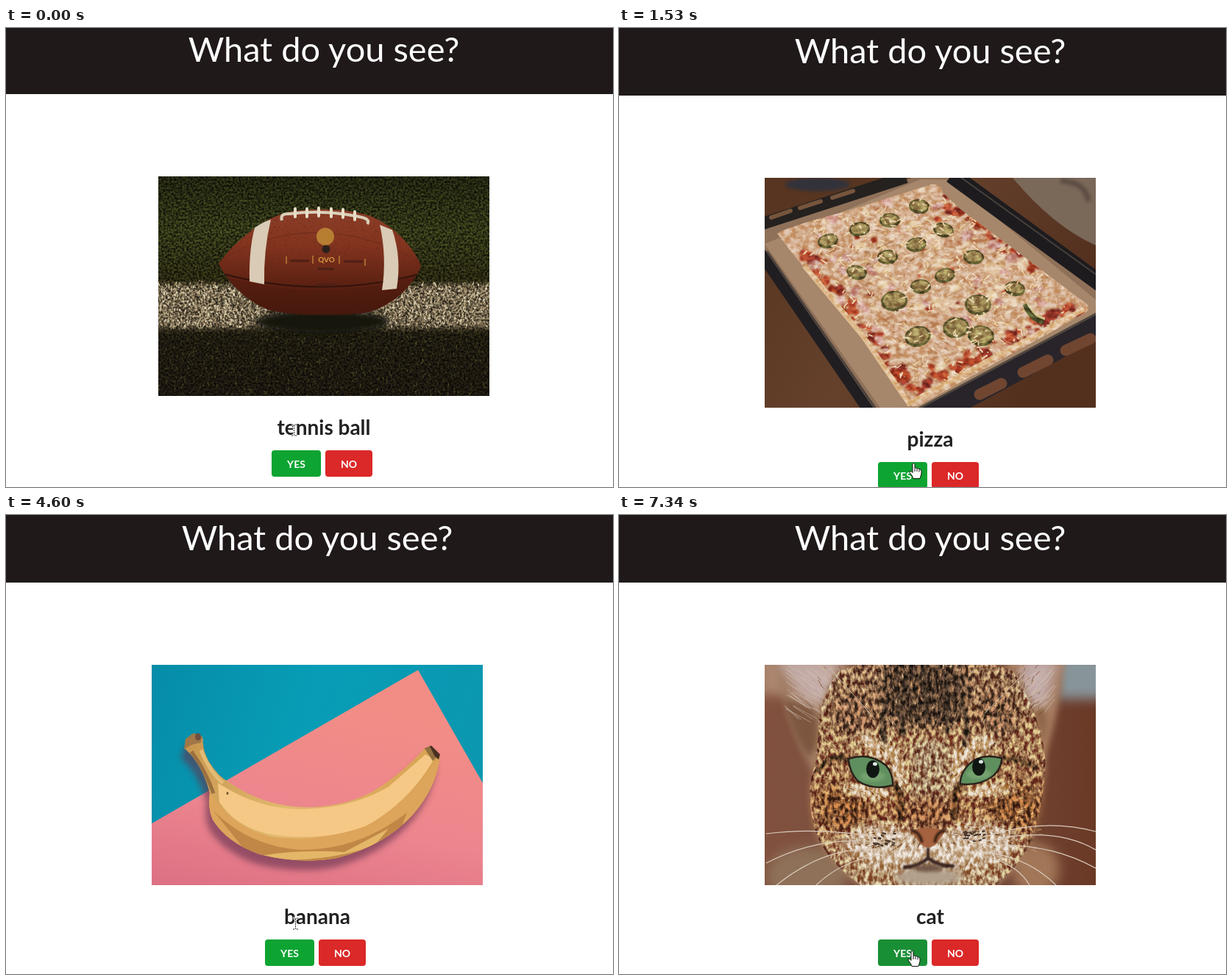
These frames come from a looping animation (825 by 625 pixels, 7460 ms). An HTML page:

```html
<!DOCTYPE html>
<html lang="en">
<head>
<meta charset="utf-8">
<title>What do you see?</title>
<style>
html, body { margin: 0; width: 100%; height: 100%; overflow: hidden; background: #fff; }
svg { display: block; font-family: Lato, sans-serif; }
.grain { mix-blend-mode: overlay; }
</style>
</head>
<body>
<svg id="stage" width="825" height="625" viewBox="0 0 825 625"></svg>
<script>
const LOOP = 7460;
let seed = 7;
const rnd = () => (seed = seed * 16807 % 2147483647) / 2147483647;
const spread = a => (rnd() * 2 - 1) * a;
const within = (x, y, w, h) => () => [x + rnd() * w, y + rnd() * h];

// Drawing helpers, all in stage coordinates
const rect = (x, y, w, h, f, a = '') => `<rect x="${x}" y="${y}" width="${w}" height="${h}" fill="${f}" ${a}/>`;
const shape = (d, f, a = '') => `<path d="${d}" fill="${f}" ${a}/>`;
const line = (d, c, w, a = '') => `<path d="${d}" fill="none" stroke="${c}" stroke-width="${w}" ${a}/>`;
const oval = (x, y, rx, ry, f, rot = 0, a = '') =>
  `<ellipse cx="${x}" cy="${y}" rx="${rx}" ry="${ry}" fill="${f}" transform="rotate(${rot} ${x} ${y})" ${a}/>`;
const blur = n => `filter="url(#blur${n})"`;
const soft = (n, body) => `<g ${blur(n)}>${body}</g>`;
const clip = (id, body) => `<g clip-path="url(#${id})">${body}</g>`;
const grain = (id, d, opacity) => shape(d, '#888', `class="grain" filter="url(#${id})" opacity="${opacity}"`);
const clipDef = (id, d) => `<clipPath id="${id}"><path d="${d}"/></clipPath>`;
const grad = (id, stops, x2 = 0, y2 = 1) => `<linearGradient id="${id}" x1="0" y1="0" x2="${x2}" y2="${y2}">` +
  stops.map((c, i) => `<stop offset="${i / (stops.length - 1)}" stop-color="${c}"/>`).join('') + '</linearGradient>';

// Procedural texture: noise mapped on a row of colours
function texture(id, freq, gain, colors = ['#000000', '#ffffff']) {
  const row = `${gain} 0 0 0 ${.5 - gain / 2} `;
  const channel = (name, i) => `<feFunc${name} type="table" tableValues="` +
    colors.map(c => (parseInt(c.substr(1 + 2 * i, 2), 16) / 255).toFixed(3)).join(' ') + '"/>';
  return `<filter id="${id}" x="0" y="0" width="100%" height="100%" color-interpolation-filters="sRGB">` +
    `<feTurbulence type="fractalNoise" baseFrequency="${freq}" numOctaves="4" seed="5"/>` +
    `<feColorMatrix values="${row.repeat(3)}0 0 0 0 1"/>` +
    `<feComponentTransfer>${['R', 'G', 'B'].map(channel).join('')}</feComponentTransfer>` +
    '<feComposite in2="SourceGraphic" operator="in"/></filter>';
}

// Many short strokes joined in one path
function blades(n, color, width, pos, step) {
  let d = '';
  for (let i = 0; i < n; i++) {
    const [x, y] = pos(), [dx, dy] = step(x, y);
    d += `M${x.toFixed(1)} ${y.toFixed(1)}l${dx.toFixed(1)} ${dy.toFixed(1)}`;
  }
  return line(d, color, width);
}
function blobs(n, colors, pos, min, max) {
  let s = '';
  for (let i = 0; i < n; i++) {
    const [x, y] = pos().map(Math.round), r = min + rnd() * (max - min);
    s += oval(x, y, r.toFixed(1), (r * (.4 + rnd() * .4)).toFixed(1), colors[i % colors.length], Math.round(spread(60)));
  }
  return s;
}

const shapes = {
  ball: 'M289 321C306 297 342 262 382 251C417 244 462 246 492 255C527 267 557 302 564 325C552 352 527 377 492 387C457 393 387 392 357 384C327 372 302 347 289 321Z',
  pizza: 'M198 250Q260 215 330 205H505Q590 225 648 275V452Q560 488 450 496Q300 500 198 440Z',
  dough: 'M215 280Q225 272 300 252L425 213Q438 211 440 224L462 245L636 376Q642 384 630 390L415 510Q400 520 390 510L330 420L250 325Z',
  banana: 'M243 318Q246 302 252 299Q264 296 268 305Q266 318 276 336Q288 356 302 363Q350 398 412 398Q470 397 512 368Q545 345 569 318Q578 311 590 327Q586 370 553 408Q515 450 450 467Q400 476 345 462Q300 446 281 415Q274 400 277 378Q268 345 250 325Z',
  head: 'M300 212Q420 170 535 212Q578 280 580 345Q575 400 562 440Q540 485 505 510H338Q275 470 264 420Q252 370 270 330Q265 255 300 212Z'
};

function drawBall() {
  const grass = () => [spread(4), -3 - rnd() * 4], bar = within(207, 350, 450, 60);
  return rect(207, 202, 450, 299, 'url(#turf)') +
    blades(400, '#39401988', 1, within(207, 206, 450, 140), grass) +
    blades(500, '#39381a', 1, within(207, 412, 450, 92), grass) +
    rect(200, 350, 464, 58, '#72664f', blur(4)) +
    blades(700, '#443b2b', 1.6, bar, grass) + blades(700, '#9a8a6d', 1.3, bar, grass) +
    blades(600, '#c8b998', 1.1, bar, grass) +
    grain('fine', 'M207 202h450v299h-450Z', .6) +
    oval(430, 400, 92, 17, '#15120d', 0, blur(4)) +
    shape(shapes.ball, 'url(#hide)') +
    clip('cBall', blades(900, '#642617', 1, within(285, 245, 285, 148), () => [1.2, .6]) +
      shape('M285 334Q425 380 566 334V400H285Z', '#511b10', 'opacity=".6"') +
      line('M285 332Q425 372 566 334', '#32130c', 2) + line('M292 316Q420 240 562 318', '#6c2c1d', 1)) +
    shape('M338 272Q349 264 360 261Q350 302 351 349L331 345Q330 302 338 272Z', '#d9cbb5') +
    shape('M508 268L525 275Q538 312 531 355L511 357Q518 312 508 268Z', '#d9cbb5') +
    line('M375 262Q372 252 386 253Q432 247 480 257Q496 260 491 267', '#d9cfb8', 4) +
    line('M393 246v11M409 246v11M425 245v11M442 246v11M458 247v11M474 250v11', '#e8dec7', 4, 'stroke-linecap="round"') +
    `<circle cx="434" cy="284" r="12" fill="#b77e32"/><circle cx="435" cy="301" r="5.5" fill="#2b211c"/>` +
    line('M381 311v10M417 310v11M453 310v11M488 314v10', '#c08a3b', 1.3) +
    line('M386 317h26M459 318h26M424 328h22M421 350h29', '#4d2015', 3) +
    `<text x="435.5" y="319" font-size="10" font-weight="700" fill="#d39a42" text-anchor="middle">QVO</text>`;
}

function drawPizza() {
  const all = within(198, 225, 450, 235);
  const meat = (x, y, rx, ry, r) => oval(x, y + 4, rx, ry, '#42200f', r) + oval(x, y, rx - 1, ry - 1, '#80401d', r) +
    oval(x - 3, y - 2, rx * .65, ry * .45, '#a86434', r);
  return rect(198, 204, 450, 300, '#7a6d66') + rect(198, 210, 90, 45, '#5f4b48', blur(8)) +
    rect(198, 440, 450, 64, '#40302f') + line('M198 478Q240 490 300 504M560 498L648 478', '#6a4a3c', 5) +
    shape(shapes.pizza, '#c77a36', 'filter="url(#cheese)"') +
    clip('cPizza', soft(1,
      blobs(70, ['#a4451b', '#c4662a', '#8c3a17'], all, 4, 14) +
      blobs(85, ['#eee0bd', '#e9cf9a', '#dfdcc6'], all, 4, 17) +
      blobs(200, ['#e0a052', '#7b3214', '#f2e6cb', '#bd6325'], all, 1, 5) +
      blobs(22, ['#66652f', '#85793a', '#4f3420'], all, 3, 9)) +
      line('M402 204L421 320L434 455M216 360L421 320L640 418', '#93411b', 4, 'opacity=".6" ' + blur(1))) +
    soft(1, line('M192 252Q250 218 335 208M505 212Q590 232 654 284', '#dcc6a4', 9) +
      line('M192 412Q290 466 400 474Q540 474 654 426', '#8a2b2a', 13, 'opacity=".8" stroke-dasharray="70 9 34 14"') +
      line('M190 437Q270 488 410 488Q555 482 656 443', '#cf9f63', 19) +
      line('M190 431Q275 480 410 482Q550 476 656 438', '#efdab2', 9, 'stroke-dasharray="58 7 31 5"')) +
    soft(1, meat(275, 288, 37, 12, -4) + meat(515, 270, 31, 12, 8) + meat(608, 340, 40, 13, -16) +
      meat(327, 404, 42, 21, -16) + meat(350, 313, 20, 10, 15) + meat(466, 386, 13, 20, -20) +
      meat(466, 234, 27, 8, 10) + meat(310, 244, 17, 11, -25)) +
    line('M586 323l20 -3M526 358q36 10 70 8', '#c5251a', 6) +
    line('M536 390Q538 360 558 356Q575 358 574 382', '#e9c680', 5) +
    oval(432, 494, 19, 9, '#2c2628', 0, blur(1)) + oval(548, 479, 20, 9, '#302426', 0, blur(1)) +
    oval(218, 418, 18, 7, '#4f4a2a', 15, blur(1)) + grain('crumb', shapes.pizza, .45);
}

function drawTray() {
  const edge = (x1, y1, x2, y2) => () => {
    const k = rnd();
    return [x1 + (x2 - x1) * k + spread(10), y1 + (y2 - y1) * k + spread(8)];
  };
  const pickles = [[284, 290], [327, 274], [368, 262], [408, 243], [441, 275], [404, 295], [365, 312], [482, 312],
    [323, 333], [443, 337], [374, 372], [488, 377], [538, 355], [406, 420], [458, 408], [410, 352], [492, 419]];
  const reds = ['#a73d20', '#8e3027', '#bd5130'];
  const shred = () => [spread(9), spread(7)], middle = within(255, 235, 355, 245);
  return rect(198, 204, 450, 313, 'url(#wood)') +
    shape('M535 204H648V296Q590 270 535 204Z', '#7a6859') + line('M600 208q35 2 38 28', '#5c4b43', 7, blur(2)) +
    shape('M198 204H380L198 258Z', '#573521') + oval(270, 213, 44, 9, '#30303b', 0, blur(2)) +
    shape('M198 270L398 204H462L648 352V398L420 517H340L198 318Z', '#8f7159') +
    shape('M198 294L410 206L450 207L648 370V396L400 530L355 517Z', '#a6876b') +
    line('M190 268L390 203', '#24211f', 17) + line('M207 258l26 -9M246 245l28 -9M290 231l28 -9', '#76553c', 6, 'stroke-linecap="round"') +
    line('M192 306L340 522', '#211e21', 15) + line('M201 304L350 520', '#4c423d', 3) +
    line('M452 200L660 352', '#1d1b1e', 23) + line('M464 203L660 344', '#47403b', 2) +
    line('M400 540L660 400', '#28242a', 33) + line('M400 522L660 383', '#51473f', 3) +
    line('M490 499l30 -15M549 469l34 -17M607 439l34 -16', '#704631', 15, 'stroke-linecap="round"') +
    shape(shapes.dough, '#d2aa88') +
    clip('cDough', soft(1, blobs(100, ['#d9b69a', '#c99a77', '#e1c4a3'], within(220, 215, 410, 290), 7, 17) +
      blobs(50, reds, edge(252, 305, 390, 485), 3, 10) + blobs(50, reds, edge(400, 490, 620, 380), 3, 10) +
      blobs(32, reds, edge(435, 225, 615, 365), 3, 8) + blobs(36, reds, within(270, 250, 300, 200), 2, 6) +
      blobs(80, ['#d9aba0', '#c9968a', '#e7d1ae'], middle, 4, 10)) +
      blades(260, '#b9906a', 1.5, middle, shred) +
      pickles.map(([x, y], i) => oval(x, y, y > 360 ? 18 : 14, y > 360 ? 14 : 10, '#5f5a30', i * 37 % 30 - 15) +
        oval(x, y - 1, y > 360 ? 15 : 12, y > 360 ? 11 : 7, '#9c8753', i * 37 % 30 - 15)).join('') +
      blades(520, '#e6cda6', 2, middle, shred) + blades(180, '#f0dcb6', 1.5, middle, shred)) +
    line('M252 324L332 420L394 511L632 383', '#dfbc91', 7) +
    line('M552 376q8 22 25 24', '#56582f', 7) + line('M555 374q10 19 24 22', '#d9ca9c', 3) +
    grain('crumb', shapes.dough, .35);
}

function drawCar() {
  const pillars = [[262, 22], [350, 24], [410, 25], [461, 18], [502, 38]];
  const wheel = (x, y, r) => oval(x, y, r, r, '#101113') + oval(x, y, r * .73, r * .73, '#8b8e8b') +
    oval(x, y, r * .52, r * .52, '#35383a') +
    line(`M${x - r * .65} ${y}h${r * 1.3}M${x} ${y - r * .65}v${r * 1.3}`, '#9fa29e', 2);
  const bars = Array.from({ length: 9 }, (_, i) => {
    const y = 376 + i * 7 + i * i * .35, x = 525 - i * 16;
    return shape(`M${x} ${y}L650 ${y + 2}V${y + 4 + i * .4}L${x - 8} ${y + 3 + i * .4}Z`, '#bcbbb2');
  }).join('');
  return rect(198, 204, 450, 253, '#292731') +
    soft(2, blobs(45, ['#3b3942', '#4e4c4e', '#1e1d29'], within(198, 206, 450, 100), 7, 26)) +
    pillars.map(([x, w]) => rect(x, 200, w, 104, '#99968c', blur(2))).join('') +
    rect(198, 246, 67, 13, '#c9922d') + rect(203, 250, 48, 5, '#684f27') +
    rect(280, 276, 260, 28, '#605e5c', blur(4)) +
    rect(420, 229, 88, 15, '#d2d0c4', blur(1)) +
    line('M303 240Q350 266 397 258Q440 234 484 260L542 302', '#89877d', 13, blur(1)) +
    line('M340 256Q400 273 435 249', '#504f4e', 5) + rect(580, 222, 12, 9, '#85847c') +
    rect(540, 278, 108, 35, '#45434b', blur(2)) + rect(198, 318, 450, 139, '#23272b') +
    rect(585, 345, 63, 17, '#777772', blur(2)) + bars +
    line('M198 380H238M198 402L340 408', '#a8a8a0', 2) + shape('M360 403H380L306 432L292 428Z', '#bdbab0') +
    soft(1, blobs(16, ['#36424b', '#77776f', '#1b3037'], within(198, 438, 185, 20), 5, 18)) +
    line('M342 450l38 -7', '#a18249', 4) + oval(417, 418, 14, 14, '#4b4e4f') + oval(460, 440, 5, 10, '#a57b61', 0, blur(2)) +
    shape('M198 304Q224 301 242 316L230 354H198Z', '#17191f') + line('M205 305l34 12', '#666a6f', 2) +
    oval(535, 368, 90, 7, '#15181b', 0, blur(2)) +
    shape('M442 344Q444 320 465 307Q510 300 536 304L562 320Q603 327 614 344L612 362Q600 371 562 370L450 362Z', '#a7aaa8') +
    shape('M462 327L476 309L502 308V329ZM506 308Q524 306 533 309L557 328L508 329Z', '#343a40') +
    line('M452 337L602 344M505 308V362', '#73797a', 1.5) + oval(449, 329, 4, 7, '#c92b2b') +
    oval(602, 344, 10, 4, '#d9dad6', 18) + wheel(573, 361, 14) +
    oval(360, 394, 130, 8, '#101215', 0, blur(2)) +
    shape('M232 352L237 329Q256 309 284 305Q340 300 370 305L421 334Q472 340 485 354L491 383L466 393L270 389L232 377Z', '#15191b') +
    line('M264 304L370 303', '#686a69', 2) + line('M266 306l-4 -9', '#777', 1) +
    shape('M250 330L264 313L296 310L291 336ZM300 310H328L333 340L296 337ZM332 311L359 312L385 339L338 341Z', '#2b3436') +
    shape('M369 315L390 314L427 335L394 340Z', '#a8b6b1') +
    line('M240 342L398 352L470 348M333 340V386M286 337L292 381', '#444b4b', 1.2) +
    oval(236, 338, 3, 7, '#d43429') + oval(458, 360, 13, 6, '#dedfc9', 8) +
    line('M472 351l13 3M474 356l13 2', '#a6aaa7', 2) + rect(471, 374, 18, 7, '#7b7f7b') +
    wheel(266, 379, 17) + wheel(416, 385, 18);
}

function drawBanana() {
  return rect(198, 204, 450, 300, 'url(#teal)') +
    shape('M198 420L560 211L648 365V504H198Z', 'url(#pink)') +
    `<g transform="translate(-5 13)">${shape(shapes.banana, '#63304f', 'opacity=".62" ' + blur(4))}</g>` +
    shape(shapes.banana, 'url(#peel)') +
    clip('cBanana', shape('M276 374Q300 423 360 438Q470 455 560 367L590 327L590 390L470 475H340L270 420Z', '#dda55b') +
      shape('M281 402Q330 451 400 456Q480 456 545 405L530 444L450 475H340Z', '#b98042', 'opacity=".8"') +
      shape('M288 365Q350 405 414 400Q474 397 520 370L570 326L582 332Q548 391 490 423Q427 447 356 434Q312 424 290 391Z', '#f5c885') +
      shape('M345 464Q400 455 460 459L520 427L502 449Q440 474 345 469Z', '#e4b768') +
      line('M265 320Q276 349 295 365', '#e2bb74', 5) + line('M252 322Q272 350 282 379', '#9a7041', 5)) +
    shape('M242 319L244 305L255 297L267 302L265 310L252 313Z', '#a17748') + oval(261, 302, 4, 5, '#6f5140') +
    shape('M569 318L578 314L590 326L588 333Z', '#4a3023') +
    shape('M569 318L576 315L584 331L580 335Z', '#927040') + oval(301, 379, 1.5, 2, '#775631');
}

function drawCat() {
  const out = (x, y) => {
    const dx = x - 420, dy = y - 420, r = Math.hypot(dx, dy) + 1, len = 3 + rnd() * 6;
    return [dx / r * len + spread(2), dy / r * len + spread(2)];
  };
  const face = within(272, 206, 300, 250);
  const eye = (d, px, py) => line(d, '#2b211b', 5) + shape(d, '#5f8f5e') +
    oval(px, py + 10, 17, 7, '#86b07c', 0, 'opacity=".6" ' + blur(2)) + oval(px, py, 9, 12, '#101713') +
    oval(px + 3, py - 7, 3, 2.5, '#dfe9e5');
  return rect(198, 204, 450, 300, 'url(#room)') +
    rect(595, 190, 70, 60, '#87959b', blur(8)) + rect(190, 190, 65, 55, '#ad8770', blur(8)) +
    oval(255, 490, 55, 38, '#8e7159', 0, blur(8)) + oval(566, 482, 32, 36, '#a27758', 0, blur(8)) +
    shape('M207 195H315L300 305L265 352Q237 305 222 245Z', '#a07a62', blur(4)) +
    shape('M212 195H300L289 262L250 250Z', '#c3aaa6', blur(8)) +
    shape('M224 250L262 262L280 300L258 330Q235 300 224 250Z', '#7d573f', blur(4)) +
    shape('M525 195H605Q598 285 570 352L532 300Z', '#a57c5f', blur(4)) +
    shape('M548 195H598L580 262L545 250Z', '#c0a9a8', blur(8)) +
    oval(566, 292, 14, 30, '#8e6547', 12, blur(4)) +
    blades(65, '#d5c6b888', 1, within(225, 205, 70, 60), () => [15 + rnd() * 20, 18]) +
    blades(55, '#d6c4b288', 1, within(550, 205, 45, 55), () => [-12 - rnd() * 18, 18]) +
    shape(shapes.head, 'url(#fur)', blur(4)) +
    oval(414, 238, 62, 50, '#5c4433', 0, blur(8)) + oval(320, 270, 30, 34, '#805c42', 20, blur(8)) +
    oval(512, 270, 30, 34, '#805c42', -20, blur(8)) +
    oval(306, 398, 36, 34, '#85522f', 0, blur(8)) + oval(535, 398, 36, 36, '#85522f', 0, blur(8)) +
    oval(352, 317, 34, 10, '#d3b894', 25, blur(4)) + oval(483, 317, 32, 10, '#d3b894', -25, blur(4)) +
    oval(336, 377, 36, 8, '#d8bd98', 10, blur(4)) + oval(505, 375, 34, 8, '#d8bd98', -10, blur(4)) +
    oval(381, 352, 7, 26, '#dcc4a2', -12, blur(4)) + oval(458, 350, 7, 26, '#dcc4a2', 12, blur(4)) +
    oval(370, 452, 62, 27, '#d2bda6', 8, blur(8)) + oval(478, 450, 62, 27, '#d2bda6', -8, blur(8)) +
    shape('M397 315Q420 295 449 315L447 394L450 425H394L396 390Z', '#a48667', blur(4)) +
    oval(421, 406, 34, 24, '#8c5838', 0, blur(8)) +
    blades(650, '#5a3f2caa', .9, face, out) + blades(650, '#d0ae88aa', .9, face, out) + blades(380, '#9a6a42', 1, face, out) +
    blades(330, '#332620', 1.1, within(365, 204, 100, 85), out) +
    soft(2, line('M365 252Q352 285 363 314M390 222Q381 268 386 300M416 208V267M443 222Q449 266 445 297M465 254Q480 285 468 314', '#3f3027', 6) +
      line('M312 331Q285 328 268 350M520 331Q545 330 566 345', '#49301f', 6) +
      line('M374 366Q388 388 380 418M463 365Q450 388 459 414', '#54341f', 8)) +
    grain('hair', shapes.head, .7) +
    oval(421, 493, 46, 12, '#b3a08c', 0, blur(4)) +
    eye('M313 333Q340 324 362 342Q371 352 371 367Q345 374 325 361Q315 350 313 333Z', 345, 346) +
    eye('M519 332Q490 325 474 343Q465 354 465 365Q490 368 508 354Q518 345 519 332Z', 489, 343) +
    shape('M397 430Q420 422 444 430L432 447Q420 458 409 447Z', '#a5623f') +
    soft(1, line('M397 430Q408 430 412 446M444 430Q432 430 429 446', '#3c2219', 4) +
      line('M420 453V468', '#3a221b', 4) + line('M386 480Q408 479 420 467Q434 479 456 478', '#38241d', 5)) +
    oval(420, 481, 20, 5, '#705647', 0, blur(2)) +
    blades(20, '#49352a', 2.2, within(345, 433, 28, 17), () => [4, 1]) +
    blades(20, '#49352a', 2.2, within(467, 431, 28, 17), () => [4, -1]) +
    line('M355 446Q275 435 200 474M350 455Q280 451 214 504M358 463Q304 469 268 504M348 438Q270 425 200 434M483 443Q570 410 648 431M492 451Q580 443 648 481M487 459Q550 461 594 504M495 445Q590 422 648 456M500 465Q542 476 558 504', '#d9cabb', 1.2) +
    line('M286 208L348 278M552 214L497 270', '#cdbda9', 1);
}

const pics = {
  ball: { label: 'tennis ball', draw: drawBall, x: 207, y: 202, h: 299 },
  pizza: { label: 'pizza', draw: drawPizza, x: 198, y: 204, h: 300 },
  tray: { label: 'pizza', draw: drawTray, x: 198, y: 204, h: 313 },
  car: { label: 'car', draw: drawCar, x: 198, y: 204, h: 253 },
  banana: { label: 'banana', draw: drawBanana, x: 198, y: 204, h: 300 },
  cat: { label: 'cat', draw: drawCat, x: 198, y: 204, h: 300 }
};
const green = { base: '#21ba45', hover: '#16ab39', focus: '#0ea432', down: '#198f35' };
const red = { base: '#db2828', hover: '#d01919', focus: '#ca1010', down: '#b21e1e' };

// time, picture, pointer, x, y, yes state, no state
const steps = [
  [0, 'ball', 'beam', 391, 547, 'focus', 'base'],
  [120, 'ball', 'hand', 441, 584, 'focus', 'hover'],
  [240, 'ball', 'hand', 445, 591, 'focus', 'hover'],
  [390, 'ball', 'hand', 447, 592, 'focus', 'hover'],
  [700, 'ball', 'hand', 447, 592, 'base', 'down'],
  [850, 'ball', 'hand', 447, 592, 'base', 'focus'],
  [1100, 'pizza', 'hand', 400, 593, 'hover', 'focus'],
  [1250, 'pizza', 'hand', 401, 592, 'hover', 'focus'],
  [1390, 'pizza', 'hand', 401, 592, 'down', 'base'],
  [1530, 'tray', 'hand', 401, 592, 'focus', 'base'],
  [2180, 'tray', 'hand', 401, 594, 'focus', 'base'],
  [2330, 'tray', 'hand', 402, 607, 'focus', 'base'],
  [2480, 'tray', 'hand', 401, 611, 'focus', 'base'],
  [2790, 'tray', 'hand', 401, 611, 'down', 'base'],
  [2910, 'tray', 'hand', 401, 611, 'focus', 'base'],
  [3030, 'car', 'hand', 401, 611, 'focus', 'base'],
  [3560, 'car', 'arrow', 399, 611, 'focus', 'base'],
  [3710, 'car', 'arrow', 392, 572, 'focus', 'base'],
  [3860, 'car', 'hand', 402, 558, 'focus', 'base'],
  [4010, 'car', 'hand', 393, 555, 'focus', 'base'],
  [4320, 'car', 'hand', 393, 555, 'down', 'base'],
  [4460, 'car', 'hand', 393, 555, 'focus', 'base'],
  [4600, 'banana', 'beam', 393, 556, 'focus', 'base'],
  [5100, 'banana', 'arrow', 396, 571, 'focus', 'base'],
  [5240, 'banana', 'hand', 398, 585, 'focus', 'base'],
  [5360, 'banana', 'hand', 399, 590, 'focus', 'base'],
  [5480, 'banana', 'hand', 399, 592, 'focus', 'base'],
  [5940, 'banana', 'hand', 399, 593, 'down', 'base'],
  [6060, 'banana', 'hand', 399, 593, 'focus', 'base'],
  [6310, 'cat', 'hand', 399, 593, 'focus', 'base'],
  [7340, 'cat', 'hand', 399, 593, 'down', 'base']
];

const beam = 'M-3 -7h2.5l1 1l1 -1h2.5M.5 -6v13M-3 8h2.5l1 -1l1 1h2.5';
const pointers = {
  hand: shape('M-2 1.5Q-.5 -.5 1 1.5V7.5Q3 6 4 8Q6 7 7 9Q9.5 8 10 11V15L8 21.5H-1L-2.5 18L-6 13Q-6.5 10.5 -4 11.5L-2 13.5Z', '#fff', 'stroke="#111"') +
    line('M1 8v4M4 8.5v3.5M7 9.5v3', '#111', 1),
  arrow: shape('M.5 .5V16.5L4.2 13L6.6 18.5L9 17.5L6.6 12.2H11.8Z', '#fff', 'stroke="#111"'),
  beam: line(beam, '#fff', 3) + line(beam, '#222', 1, 'stroke-dasharray="2 1"')
};

const text = (x, y, size, weight, fill, s, id = '') =>
  `<text id="${id}" x="${x}" y="${y}" font-size="${size}" font-weight="${weight}" fill="${fill}" text-anchor="middle">${s}</text>`;
const $ = id => document.getElementById(id);

$('stage').innerHTML = '<defs>' +
  [1, 2, 4, 8].map(n => `<filter id="blur${n}" x="-50%" y="-50%" width="200%" height="200%"><feGaussianBlur stdDeviation="${n}"/></filter>`).join('') +
  texture('cheese', '.035 .055', 3, ['#5a2412', '#99441a', '#c8742f', '#de9f52', '#ecca90', '#f2e6cb']) +
  texture('crumb', '.12 .16', 2.6) + texture('fine', '.35', 2.4) + texture('hair', '.2 .12', 2.6) +
  grad('turf', ['#20220f', '#303516', '#26240f', '#1d190f', '#1b160e']) + grad('hide', ['#8b3e28', '#83341f', '#612313', '#35130b']) +
  grad('wood', ['#57351f', '#65412c', '#53301e'], 1, .4) + grad('teal', ['#068ca8', '#079db6', '#0b97b0'], 1, .2) +
  grad('pink', ['#f28d86', '#ec858e', '#d96c82'], -.3, 1) + grad('peel', ['#c7954d', '#e2b970', '#d7a150'], 1, .2) +
  grad('room', ['#81513e', '#765043', '#6b3926'], 1, 0) + grad('fur', ['#8f6c50', '#a67d59', '#a2714b', '#b39472']) +
  clipDef('cBall', shapes.ball) + clipDef('cPizza', shapes.pizza) + clipDef('cDough', shapes.dough) + clipDef('cBanana', shapes.banana) +
  Object.entries(pics).map(([k, p]) => clipDef('box-' + k, `M${p.x} ${p.y}h450v${p.h}h-450Z`)).join('') + '</defs>' +
  rect(0, 0, 825, 625, '#fff') + rect(0, 0, 825, 92, '#1f191a', 'id="bar"') + text(423, 48, 47, 400, '#fff', 'What do you see?', 'title') +
  Object.entries(pics).map(([k, p]) => `<g id="pic-${k}" clip-path="url(#box-${k})">${p.draw()}</g>`).join('') +
  text(0, 0, 28, 700, '#212121', '', 'label') +
  `<g id="buttons">${rect(-71, 0, 67, 36, '', 'id="yes" rx="4"')}${rect(2, 0, 64, 36, '', 'id="no" rx="4"')}` +
  text(-37.5, 24, 14, 700, '#fff', 'YES') + text(34, 24, 14, 700, '#fff', 'NO') + '</g>' +
  Object.entries(pointers).map(([k, s]) => `<g id="${k}">${s}</g>`).join('');

let shown = null;
function render(t) {
  const step = steps.findLast(s => s[0] <= t);
  if (step === shown) return;
  shown = step;
  const [, name, pointer, x, y, yes, no] = step, pic = pics[name];
  const mid = pic.x + 225, end = pic.y + pic.h;
  for (const k in pics) $('pic-' + k).style.display = k === name ? '' : 'none';
  for (const k in pointers) $(k).style.display = k === pointer ? '' : 'none';
  $(pointer).setAttribute('transform', `translate(${x} ${y})`);
  $('bar').setAttribute('height', pic.y - 112);
  $('title').setAttribute('x', mid);
  $('title').setAttribute('y', pic.y - 156);
  $('label').textContent = pic.label;
  $('label').setAttribute('x', mid);
  $('label').setAttribute('y', end + 53);
  $('buttons').setAttribute('transform', `translate(${mid} ${end + 74})`);
  $('yes').setAttribute('fill', green[yes]);
  $('no').setAttribute('fill', red[no]);
}

const start = performance.now();
function tick() {
  render((performance.now() - start) % LOOP);
  requestAnimationFrame(tick);
}
tick();
</script>
</body>
</html>
```
